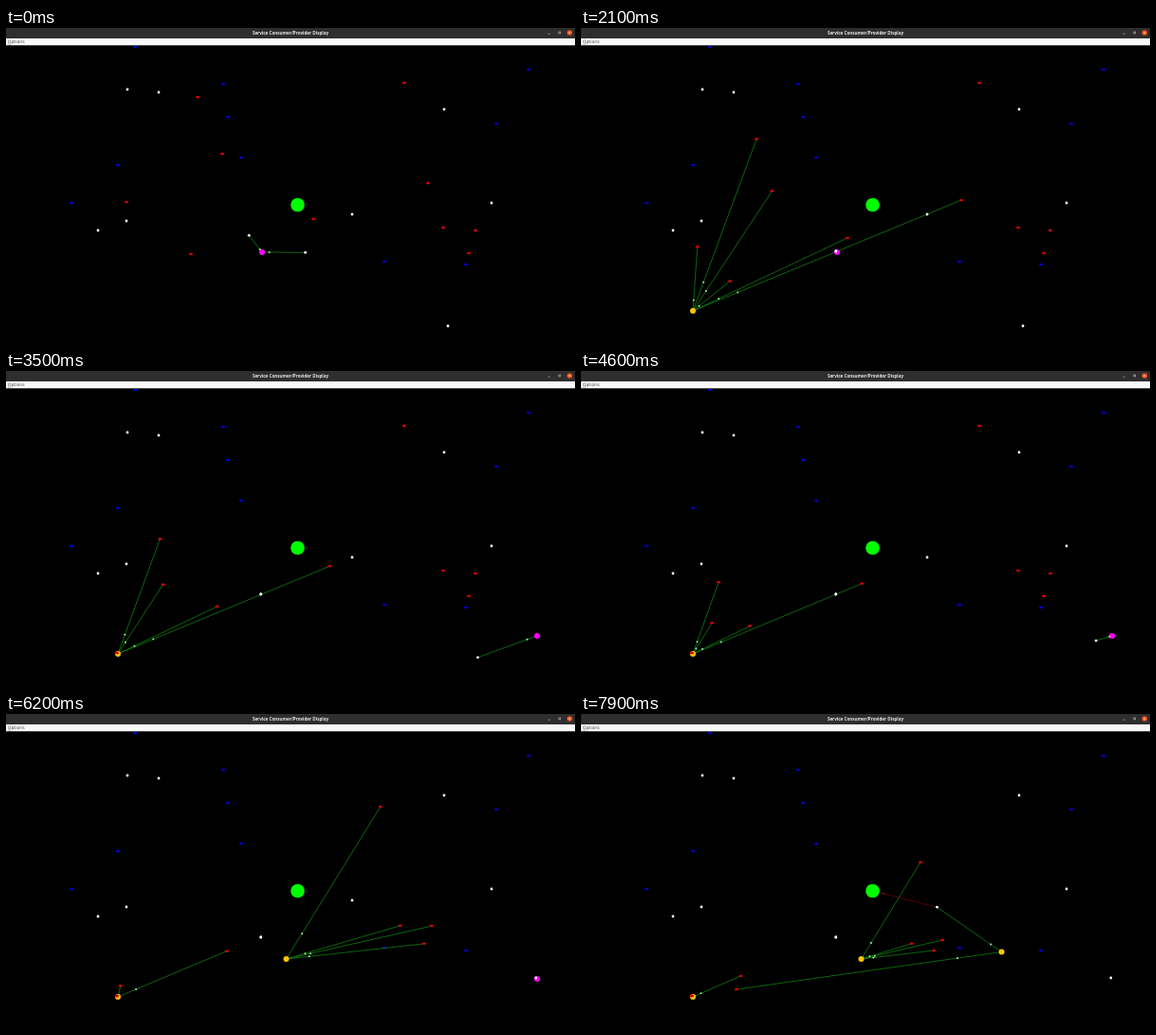
These frames come from a looping animation (600x333 px, 8000 ms). An HTML page:

```html
<!DOCTYPE html>
<html lang="en">
<head>
<meta charset="utf-8">
<title>Service Consumer/Provider Display</title>
<style>
  html, body { margin: 0; width: 100%; height: 100%; overflow: hidden; background: #000; }
  svg { display: block; width: 100%; height: 100%; }
</style>
</head>
<body>
<svg viewBox="0 0 600 333" xmlns="http://www.w3.org/2000/svg">
  <rect width="600" height="333" fill="#000"/>
  <g id="scene"></g>
  <rect width="600" height="11" fill="#302d2e"/>
  <text x="300" y="6.9" text-anchor="middle" font-family="'Open Sans', sans-serif" font-weight="700" font-size="4.6" fill="#e8e8e8">Service Consumer/Provider Display</text>
  <path d="M571.5 6.2h2.4" stroke="#bbb" stroke-width=".6"/>
  <rect x="582.8" y="4" width="1.9" height="1.9" fill="none" stroke="#bbb" stroke-width=".6"/>
  <circle cx="594.3" cy="5" r="2.8" fill="#e9541f"/>
  <path d="M593.4 4.1l1.8 1.8m0-1.8l-1.8 1.8" stroke="#fff" stroke-width=".5"/>
  <rect y="11" width="600" height="7.3" fill="#f8f8f8"/>
  <text x="1.8" y="16.4" font-family="'DejaVu Sans', sans-serif" font-size="4.6" fill="#444">Options</text>
  <path d="M2 17.2h3.3" stroke="#555" stroke-width=".4"/>
</svg>
<script>
const LOOP = 8000, STEP = 100;
const HUB = [307.5, 187];
const RED = '#dc0000', BLUE = '#0000d8', WHITE = '#fff';
const YELLOW = '#ffc400', MAGENTA = '#ff00ff';

const service = (x, y, color, on, off = LOOP) => ({ x, y, color, on, off });
const m1 = service(270, 237, MAGENTA, 0, 2500);
const m2 = service(560, 280, MAGENTA, 2500, 6500);
const y1 = service(118, 299, YELLOW, 400);
const y2 = service(295.5, 259, YELLOW, 4700);
const y3 = service(443.5, 251.5, YELLOW, 6400);
const services = [m1, m2, y1, y2, y3];

// A trip is [pace at departure, service]; agents without trips stay put
const group = (color, trips, homes) => homes.map(([x, y]) => ({ color, trips, x, y }));
const agents = [
  ...group(BLUE, [], [[136, 20], [229, 59], [234, 94], [551, 44], [517, 101],
                      [118, 145], [248, 137], [69, 185], [399, 247], [485, 250]]),
  ...group(WHITE, [], [[128, 65], [161, 68], [462, 86], [512, 185], [127, 204], [97, 214]]),
  ...group(WHITE, [[-69, m1]], [[241, 199], [341, 238]]),
  ...group(WHITE, [[78, m2]], [[466, 315]]),
  ...group(WHITE, [[286, y3]], [[365, 197]]),
  ...group(RED, [[0, y1]], [[202, 73], [228, 133], [127, 184], [324, 202], [445, 164]]),
  ...group(RED, [[0, y1], [251, y3]], [[195, 239]]),
  ...group(RED, [[182, y2]], [[420, 58], [461, 211], [495, 214], [488, 238]])
];

// Distance walked: a short stall after 400 ms, then a gentle slowdown
function paceAt(t) {
  const u = (Math.max(Math.min(t, 400) + 200, t) - 1100) / 1000;
  return 48 * u - 0.6 * u * u;
}

// Current place of an agent and the service it is bound to, if any
function locate({ x, y, color, trips }, pace) {
  let to = null, asking = false;
  for (const [start, s] of trips) {
    const gone = pace - start;
    if (gone < -12) break;
    const dx = s.x - 1.2 - x, dy = s.y - 1 - y, len = Math.hypot(dx, dy);
    const there = gone > len - 4;
    const k = there ? 1 : Math.max(0, gone) / len;
    x += dx * k;
    y += dy * k;
    to = there ? null : s;
    asking = !there && gone < 20;
  }
  return { x, y, to, asking, color };
}

const n = v => v.toFixed(2);
const disc = (x, y, r, fill) => `<circle cx="${n(x)}" cy="${n(y)}" r="${r}" fill="${fill}"/>`;
const line = (p, x, y, color) =>
  `<path d="M${n(p.x)} ${n(p.y)}L${n(x)} ${n(y)}" stroke="${color}" stroke-width=".75"/>`;
const marker = (p, x, y, fill) => disc(p.x + (x - p.x) * 5 / 6, p.y + (y - p.y) * 5 / 6, 1, fill);
const dot = ({ x, y, color }) => color === WHITE
  ? disc(x, y, 1.4, color)
  : `<ellipse cx="${n(x)}" cy="${n(y)}" rx="2" ry="1.25" fill="${color}"/>`;

const scene = document.getElementById('scene');

function draw(t) {
  const pace = paceAt(t);
  const all = agents.map(a => locate(a, pace));
  const bound = all.filter(p => p.to), asking = all.filter(p => p.asking);
  const live = services.filter(s => t >= s.on && t < s.off);
  scene.innerHTML = [
    ...all.filter(p => p.color === BLUE).map(dot),
    ...asking.map(p => line(p, ...HUB, '#700000') + marker(p, ...HUB, '#b00000')),
    ...bound.map(p => line(p, p.to.x, p.to.y, '#118811')),
    disc(...HUB, 7.3, '#0f0'),
    ...live.map(s => disc(s.x, s.y, 3, s.color)),
    ...bound.map(p => marker(p, p.to.x, p.to.y, '#9cf59c')),
    ...all.filter(p => p.color !== BLUE).map(dot)
  ].join('');
}

let last = 0, origin = null;
function tick(now) {
  if (origin === null) origin = now;
  const t = Math.floor((now - origin) % LOOP / STEP) * STEP;
  if (t !== last) draw(last = t);
  requestAnimationFrame(tick);
}
draw(0);
requestAnimationFrame(tick);
</script>
</body>
</html>
```
